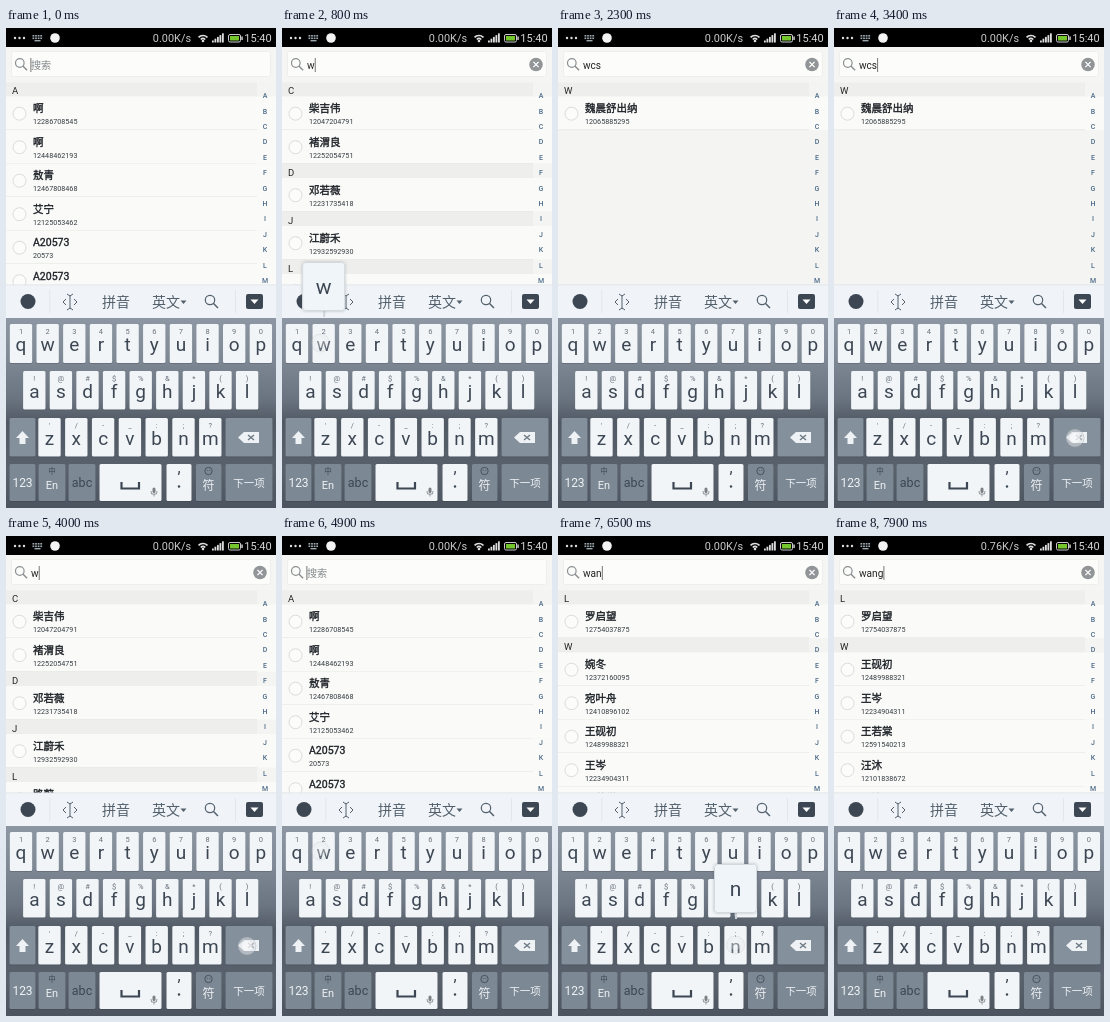
An HTML page with a canvas that plays this animation: 270 px wide and 480 px high, repeating every 8000 ms.

```html
<!DOCTYPE html>
<html lang="zh">
<head>
<meta charset="utf-8">
<style>
html, body { margin: 0; width: 100%; height: 100%; overflow: hidden; background: #f4f5f2; }
canvas { display: block; width: 270px; height: 480px; }
</style>
</head>
<body>
<canvas id="stage"></canvas>
<script>
const LOOP = 8000, BLINK = 450;
const canvas = document.getElementById('stage');
const ratio = window.devicePixelRatio || 1;
canvas.width = 270 * ratio;
canvas.height = 480 * ratio;
const c = canvas.getContext('2d');
c.scale(ratio, ratio);

const INK = '#3d4753', PALE = '#eef2f5', WHITE_KEY = '#f1f5f8';

// Contact lists by search text: [section, ...names]
const W_MATCHES = [['L', '罗启望'], ['W', '婉冬', '宛叶舟', '王砚初', '王岑', '王若棠']];
const LISTS = {
  '': [['A', '啊', '啊 ', '敖青', '艾宁', 'A20573', 'A20573']],
  w: [['C', '柴吉伟', '褚渭良'], ['D', '邓若薇'], ['J', '江蔚禾'], ['L', '路蔚']],
  wc: [['W', '邬灿', '魏晨舒出纳', '韦辰溪'], ['Z', '祝蔚城']],
  wcs: [['W', '魏晨舒出纳']],
  wa: W_MATCHES,
  wan: W_MATCHES,
  wang: [['L', '罗启望'], ['W', '王砚初', '王岑', '王若棠', '汪沐', '汪沐 ']]
};

// [touch start, key, resulting text]
const TAPS = [
  [500, 'w', 'w'], [900, 'c', 'wc'], [1600, 's', 'wcs'],
  [3300, '⌫', 'wc'], [3600, '⌫', 'w'], [3900, '⌫', ''],
  [4900, 'w', 'w'], [5400, 'a', 'wa'], [6300, 'n', 'wan'], [7400, 'g', 'wang']
];

const KEYS = {};
function addRow(letters, subs, x, pitch, y, h) {
  [...letters].forEach((ch, i) => {
    KEYS[ch] = { x: x + i * pitch, y, h, sub: subs[i] };
  });
}
addRow('qwertyuiop', '1234567890', 15, 26.65, 296, 39);
addRow('asdfghjkl', '!@#$%&*()', 28.3, 26.6, 343, 38.5);
addRow('zxcvbnm', "'/-_:;?", 43.5, 26.8, 390, 38.5);

function text(s, x, y, size, color, align = 'left', weight = 400) {
  c.font = `${weight} ${size}px Roboto, "Noto Sans CJK SC", "Noto Sans CJK", sans-serif`;
  c.textAlign = align;
  c.textBaseline = 'alphabetic';
  c.fillStyle = color;
  c.fillText(s, x, y);
}
function rect(x, y, w, h, color) {
  c.fillStyle = color;
  c.fillRect(x, y, w, h);
}
function box(x, y, w, h, r, fill, stroke) {
  c.beginPath();
  c.roundRect(x, y, w, h, r);
  paint(fill, stroke, 1);
}
function paint(fill, stroke, width) {
  if (fill) { c.fillStyle = fill; c.fill(); }
  if (stroke) { c.strokeStyle = stroke; c.lineWidth = width; c.stroke(); }
}
function disc(x, y, r, fill, stroke, width = 1) {
  c.beginPath();
  c.arc(x, y, r, 0, 7);
  paint(fill, stroke, width);
}
function poly(points, fill, stroke, width = 1) {
  c.beginPath();
  for (let i = 0; i < points.length; i += 2) c.lineTo(points[i], points[i + 1]);
  paint(fill, stroke, width);
}
function lens(x, y, r, color) {
  disc(x, y, r, null, color, 1.2);
  poly([x + r * .7, y + r * .7, x + r * 1.7, y + r * 1.7], null, color, 1.5);
}

// Made-up number derived from the contact's name
function phone(name) {
  if (name[0] === 'A') return name.slice(1);
  let n = 7;
  for (const ch of name) n = (n * 7919 + ch.charCodeAt(0) * 104729) % 999999937;
  return '12' + String(n).padStart(9, '0');
}

function statusBar(t) {
  rect(0, 0, 270, 19, '#000');
  for (const x of [9, 13.5, 18]) disc(x, 10, 1.2, '#ddd');
  for (let i = 0; i < 8; i++) rect(26.5 + i % 4 * 2.6, 7 + (i >> 2) * 2.5, 1.8, 1.6, '#9aa6ac');
  rect(28.5, 12, 6, 1.4, '#9aa6ac');
  disc(49, 10, 4.8, '#f4f4f4');
  text(t >= 7700 ? '0.76K/s' : '0.00K/s', 185, 13.8, 10.9, '#c9c9c9', 'right');
  for (const r of [3, 6]) {
    c.beginPath();
    c.arc(197, 13.5, r, -2.4, -.74);
    paint(null, '#ddd', 1.7);
  }
  disc(197, 13, 1.3, '#ddd');
  for (let i = 0; i < 5; i++) rect(206 + i * 2.5, 12.5 - i * 1.8, 1.8, 2 + i * 1.8, '#ddd');
  box(222.5, 6.5, 12, 7.5, 1.5, null, '#ccc');
  rect(224, 8, 9, 4.5, '#75c62c');
  rect(235.3, 8.5, 1.5, 3.5, '#ccc');
  text('15:40', 265.7, 13.8, 11, '#d5d5d5', 'right');
}

function contacts(query) {
  let y = 54;
  for (const [section, ...names] of LISTS[query]) {
    rect(0, y, 251, 14.5, '#eeefed');
    text(section, 6, y + 12, 9.5, '#222');
    y += 14.5;
    for (const name of names) {
      rect(0, y, 270, 33.5, '#fafbf8');
      rect(0, y + 33, 251, .7, '#e2e3e0');
      disc(13.5, y + 17.2, 6.5, '#fcfdfa', '#dcdddb');
      text(name.trim(), 27, y + 15.5, 10.5, '#1c2026');
      c.strokeStyle = '#1c2026';
      c.lineWidth = .35;
      c.strokeText(name.trim(), 27, y + 15.5);
      text(phone(name), 27, y + 27.5, 7.2, '#353b43');
      y += 33.5;
    }
  }
  for (let i = 0; i < 13; i++)
    text(String.fromCharCode(65 + i), 259, 70.2 + i * 15.4, 7, '#4a6787', 'center', 500);
}

function searchBar(value, cursorOn) {
  rect(0, 19, 270, 35.5, '#f5f6f3');
  box(5.5, 23.5, 259, 25, 2, '#fcfdfb', '#eeefec');
  lens(13.8, 35, 4.3, '#8b8f92');
  text(value || '搜索', 25, 40.5, 10.1, value ? '#222' : '#85898c');
  const end = value ? 25.2 + c.measureText(value).width : 24.5;
  if (cursorOn) rect(end, 30, .8, 14, '#555');
  if (value) {
    disc(254, 36.5, 6.8, '#929597');
    poly([251.4, 33.9, 256.6, 39.1], null, '#fff', 1.3);
    poly([256.6, 33.9, 251.4, 39.1], null, '#fff', 1.3);
  }
}

function toolbar() {
  const soft = '#53606c';
  rect(0, 257, 270, 34, '#f0f4f8');
  rect(0, 256.5, 270, .8, '#dde1e5');
  for (const x of [43.5, 229]) rect(x, 262, .7, 23, '#dde1e5');
  disc(22, 273.5, 7.5, INK);
  poly([64, 267, 64, 281], null, soft);
  poly([61, 266, 64, 268, 67, 266], null, soft);
  poly([61, 282, 64, 280, 67, 282], null, soft);
  poly([60, 271, 57, 274, 60, 277], null, soft);
  poly([68, 271, 71, 274, 68, 277], null, soft);
  text('拼音', 110, 278.8, 14, soft, 'center');
  text('英文', 146, 278.8, 14, soft);
  poly([174.5, 272.5, 180.5, 272.5, 177.5, 276], soft);
  lens(204, 272, 4.7, soft);
  box(240, 266, 17, 15, 2, INK);
  poly([244.5, 271.5, 252.5, 271.5, 248.5, 276], '#fff');
}

function keyFace(x, y, w, h, fill) {
  box(x, y + .8, w, h, 1.5, 'rgba(40,48,58,.3)');
  box(x, y, w, h, 1.5, fill);
}

function keyboard(pressed) {
  const back = c.createLinearGradient(0, 290, 0, 480);
  [[0, '#8d97a3'], [.2, '#808a96'], [.42, '#6b7581'], [.55, '#505964'], [.8, '#58616c'], [1, '#4b545f']]
    .forEach(([at, color]) => back.addColorStop(at, color));
  c.fillStyle = back;
  c.fillRect(0, 290, 270, 190);

  for (const ch in KEYS) {
    const k = KEYS[ch];
    keyFace(k.x - 11.2, k.y, 22.4, k.h, ch === pressed ? '#555f69' : WHITE_KEY);
    text(k.sub, k.x, k.y + 9.5, 7.5, '#68727c', 'center');
    text(ch, k.x, k.y + 27, 19, INK, 'center');
  }

  const grey = '#84909b';
  keyFace(3.5, 390, 26, 38.5, grey);
  poly([16.5, 403, 23, 410, 19.5, 410, 19.5, 416, 13.5, 416, 13.5, 410, 10, 410], PALE);
  keyFace(219.5, 390, 47, 38.5, grey);
  poly([232, 409.5, 238, 404, 253, 404, 253, 415, 238, 415], PALE);
  poly([242, 407, 248, 412], null, '#6f7a85', 1.4);
  poly([248, 407, 242, 412], null, '#6f7a85', 1.4);

  for (const [x, w] of [[3.5, 26], [32.5, 27], [62.5, 27], [190, 25.5], [219.5, 47]])
    keyFace(x, 436, w, 37, '#7c8893');
  text('123', 16.5, 459, 12, PALE, 'center');
  text('中', 46, 445.5, 7.5, INK, 'center');
  text('En', 46, 461, 11, PALE, 'center');
  text('abc', 76, 459, 12.5, INK, 'center');
  disc(202.5, 443, 3.7, null, INK, .8);
  disc(201.2, 442.3, .5, INK);
  disc(203.8, 442.3, .5, INK);
  text('符', 202.5, 462, 12, PALE, 'center');
  text('下一项', 243, 458.5, 10.5, PALE, 'center');

  keyFace(93.5, 436, 62, 37, WHITE_KEY);
  poly([115.5, 454, 115.5, 460.5, 133, 460.5, 133, 454], null, INK, 2.2);
  box(146.5, 459.5, 3, 5.5, 1.5, '#7c8186');
  poly([145, 463, 145.6, 466, 150.4, 466, 151, 463], null, '#7c8186', .8);
  rect(147.6, 466, .8, 2.5, '#7c8186');
  keyFace(160.5, 436, 25, 37, WHITE_KEY);
  text(',', 173, 445, 16, INK, 'center');
  disc(173, 458.5, 1.2, INK);
}

function popup(ch) {
  const { x, y } = KEYS[ch], left = x - 21.5, top = y - 62;
  rect(x - .5, top + 49, 2, 6, '#cfd6dc');
  c.shadowColor = 'rgba(30,38,48,.3)';
  c.shadowBlur = 3 * ratio;
  box(left, top, 43, 49, 3, '#f0f5f9');
  c.shadowColor = 'transparent';
  box(left + .5, top + .5, 42, 48, 3, null, '#d3d9de');
  text(ch, x, top + 32, 21, INK, 'center');
}

function touch(ch, age) {
  const k = KEYS[ch];
  let x = 241, y = 410;
  if (k) {
    x = ch === 'w' ? 38.5 : ch === 'a' ? 20 : k.x;
    y = k.y + (ch === 'a' ? 23 : 19);
  }
  c.globalAlpha = age >= 100 && age < 200 ? 1 : .45;
  disc(x, y, 9, 'rgba(225,228,231,.5)', 'rgba(150,155,160,.35)');
  disc(x, y, 5, 'rgba(255,255,255,.55)');
  c.globalAlpha = 1;
}

function draw(t) {
  let value = '', query = '', changed = 0, tap = null;
  for (const [start, key, result] of TAPS) {
    const age = t - start;
    if (age >= 0 && age < 400) tap = { key, age };
    if (age >= 200) { value = result; changed = start + 200; }
    if (age >= 300) query = result;
  }
  const cursorOn = tap || Math.floor((t - changed) / BLINK) % 2 === 0;
  const popped = tap && KEYS[tap.key] && tap.age >= 100;

  rect(0, 0, 270, 480, '#f4f5f2');
  contacts(query);
  searchBar(value, cursorOn);
  statusBar(t);
  toolbar();
  keyboard(popped && tap.age < 200 ? tap.key : '');
  if (popped) popup(tap.key);
  if (tap) touch(tap.key, tap.age);
}

const begin = performance.now();
function frame() {
  draw((performance.now() - begin) % LOOP);
  requestAnimationFrame(frame);
}
frame();
</script>
</body>
</html>
```
